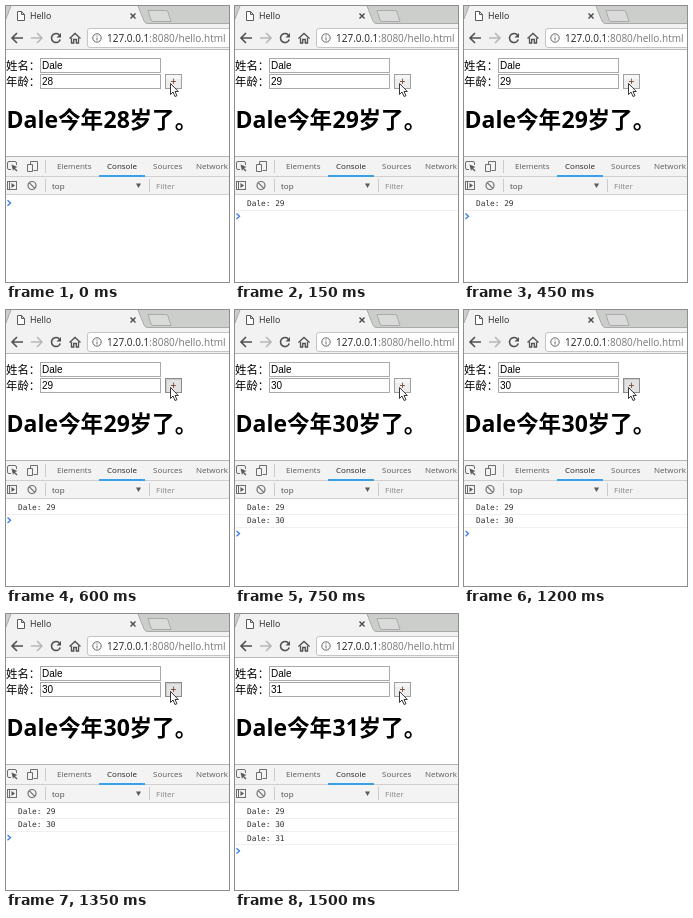
An HTML page with a canvas for the animation above (1650 ms loop, 223 by 276 pixels).

```html
<!DOCTYPE html>
<html lang="zh">
<head>
<meta charset="utf-8">
<title>Hello</title>
<style>
html, body { margin: 0; width: 100%; height: 100%; overflow: hidden; background: #fff; }
canvas { display: block; }
</style>
</head>
<body>
<canvas id="stage" width="223" height="276"></canvas>
<script>
const ctx = document.getElementById('stage').getContext('2d');
const UI = '"Open Sans", "Noto Sans", sans-serif';
const CJK = '"Noto Sans CJK SC", "Noto Sans CJK", "Noto Sans CJK JP", sans-serif';
const ARIAL = '"Liberation Sans", Arial, sans-serif';
const MONO = '"DejaVu Sans Mono", monospace';
const NAME = 'Dale';
const LOOP = 1650;
const CLICKS = [150, 750, 1500];
const PRESSES = [[600, 750], [1200, 1500]];

function rect(x, y, w, h, color) {
  ctx.fillStyle = color;
  ctx.fillRect(x, y, w, h);
}

function box(x, y, w, h, fill, stroke) {
  rect(x, y, w, h, stroke);
  rect(x + 1, y + 1, w - 2, h - 2, fill);
}

// Draws text and returns the x where it ends.
function text(str, x, y, font, color = '#000') {
  ctx.font = font;
  ctx.fillStyle = color;
  ctx.fillText(str, x, y);
  return x + ctx.measureText(str).width;
}

function path(d, stroke, width = 1, fill) {
  const p = new Path2D(d);
  if (fill) { ctx.fillStyle = fill; ctx.fill(p); }
  if (stroke) { ctx.strokeStyle = stroke; ctx.lineWidth = width; ctx.stroke(p); }
}

function ring(x, y, r, color, width = 1, from = 0, to = Math.PI * 2) {
  ctx.beginPath();
  ctx.arc(x, y, r, from, to);
  ctx.strokeStyle = color;
  ctx.lineWidth = width;
  ctx.stroke();
}

function drawTabs() {
  rect(0, 0, 223, 18, '#cccecc');
  path('M0 18 L0 13 L5 0 H132 L138 15 Q139 18 142 18 Z', null, 1, '#f2f2f2');
  path('M0 13 L5 0 M132 0 L138 15 Q139 17.5 142 17.5 H223', '#a9aba9');
  path('M142 4.5 H160 Q161.500 4.500 162 6 L165 15.5 H147 Q145.500 15.500 145 14 Z', '#a9aba9', 1, '#d9dad9');
  path('M11.5 5.5 H15.5 L18.5 8.5 V14.5 H11.5 Z M15.5 5.5 V8.500 H18.500', '#5a5a5a', 1, '#fff');
  text('Hello', 24, 13, '8.8px ' + UI, '#222');
  path('M124.500 7.500 L129.500 12.500 M129.500 7.500 L124.500 12.500', '#444', 1.3);
}

function drawToolbar() {
  rect(0, 18, 223, 26, '#f2f2f2');
  path('M17 32 H6.500 M11 27 L6 32 L11 37', '#505050', 1.6);
  path('M25 32 H35.500 M31 27 L36 32 L31 37', '#b8b8b8', 1.6);
  ring(50, 32, 4.5, '#505050', 1.6, 0.35, Math.PI * 1.75);
  path('M55 27 V31.500 H50.500 Z', null, 1, '#505050');
  path('M63.500 32.500 L69 27.500 L74.500 32.500 M65.500 32 V37 H67.700 V33.500 H70.300 V37 H72.500 V32', '#505050', 1.3);
  path('M224 22.500 H84 Q81.500 22.500 81.500 25 V39 Q81.500 41.500 84 41.500 H224', '#c4c4c4', 1, '#fff');
  ring(91, 32, 4.2, '#666');
  rect(90.5, 29.5, 1, 1, '#666');
  rect(90.5, 31.5, 1, 3, '#666');
  const font = '10px ' + UI;
  const x = text('127.0.0.1', 101, 36, font, '#222');
  text(':8080/hello.html', x, 36, font, '#777');
  rect(0, 43, 223, 1, '#b9b9b9');
}

function drawField(label, value, y) {
  text(label, 0, y + 12, '11.4px ' + CJK);
  box(34, y, 121, 15, '#fff', '#a9a9a9');
  text(value, 36, y + 11, '10px ' + ARIAL);
}

function drawButton(pressed) {
  box(159, 68, 17, 15, pressed ? '#e2e2e2' : '#ededed', pressed ? '#8c8c8c' : '#a0a0a0');
  if (pressed) {
    rect(160, 69, 15, 1, '#c9c9c9');
    rect(160, 69, 1, 13, '#c9c9c9');
  } else {
    rect(160, 69, 15, 4, '#f6f6f6');
  }
  text('+', 164.5, 79, '10px ' + ARIAL, '#6b3213');
}

function drawCursor() {
  path('M164.500 77.500 V88.500 L167 86 L169 90.500 L171 89.700 L169 85.500 H172.300 Z', '#222', 0.9, '#fff');
}

function drawHeading(age) {
  const latin = 'bold 23px ' + UI;
  const han = 'bold 22.6px ' + CJK;
  text(NAME, 0.5, 122, latin);
  text('今年', 52, 122, han);
  text(age, 97.5, 122, latin);
  text('岁了。', 123.5, 122, han);
}

function drawDevtools() {
  rect(0, 150, 223, 39, '#f3f3f3');
  for (const y of [150, 170, 188]) rect(0, y, 223, 1, y === 150 ? '#b5b5b5' : '#cfcfcf');
  rect(39, 154, 1, 13, '#ccc');
  rect(39, 173, 1, 13, '#ccc');
  rect(143, 173, 1, 13, '#ccc');

  path('M5 163.500 H3 Q1.500 163.500 1.500 162 V157 Q1.500 155.500 3 155.500 H9 Q10.500 155.500 10.500 157 V159', '#6e6e6e');
  path('M5.500 158.500 L11.500 161 L9 162 L11.500 164.500 L10.500 165.500 L8 163 L7 165 Z', null, 1, '#5a5a5a');
  path('M24.500 158 V155.500 H31.500 V164.500 H27.500 M21.500 158.500 H26.500 V165.500 H21.500 Z', '#6e6e6e');

  const font = '8px ' + UI;
  const tabs = [['Elements', 51], ['Console', 101], ['Sources', 147], ['Network', 190]];
  for (const [label, x] of tabs) text(label, x, 163, font, label === 'Console' ? '#222' : '#5a5a5a');
  rect(93, 169, 46, 2, '#3aa0e8');

  box(1, 175, 10, 9, '#f3f3f3', '#6e6e6e');
  rect(3, 175, 1, 9, '#6e6e6e');
  path('M5.500 177 V182 L9 179.500 Z', null, 1, '#5a5a5a');
  ring(26, 179.5, 4, '#6e6e6e', 1.2);
  path('M23.200 176.700 L28.800 182.300', '#6e6e6e', 1.2);
  text('top', 46, 182.5, font, '#444');
  path('M130 177.500 H135 L132.500 182 Z', null, 1, '#5a5a5a');
  text('Filter', 150, 182.5, font, '#858585');
}

function drawConsole(ages) {
  const pitch = 13.3;
  ages.forEach((age, i) => {
    const y = 200 + i * pitch;
    text(`${NAME}: ${age}`, 12, y, '7.8px ' + MONO, '#303030');
    rect(0, Math.round(y + 3.5), 223, 1, '#f0f0f0');
  });
  const y = 197 + ages.length * pitch;
  path(`M1.500 ${y - 2.7} L4.500 ${y} L1.500 ${y + 2.7}`, '#367cf1', 1.3);
}

function draw(t) {
  const count = CLICKS.filter(at => t >= at).length;
  const age = 28 + count;
  const pressed = PRESSES.some(([from, to]) => t >= from && t < to);
  rect(0, 0, 223, 276, '#fff');
  drawTabs();
  drawToolbar();
  drawField('姓名：', NAME, 52);
  drawField('年龄：', age, 68);
  drawButton(pressed);
  drawHeading(age);
  drawDevtools();
  drawConsole(Array.from({ length: count }, (_, i) => 29 + i));
  drawCursor();
}

const start = performance.now();
function tick() {
  draw((performance.now() - start) % LOOP);
  requestAnimationFrame(tick);
}
tick();
</script>
</body>
</html>
```
